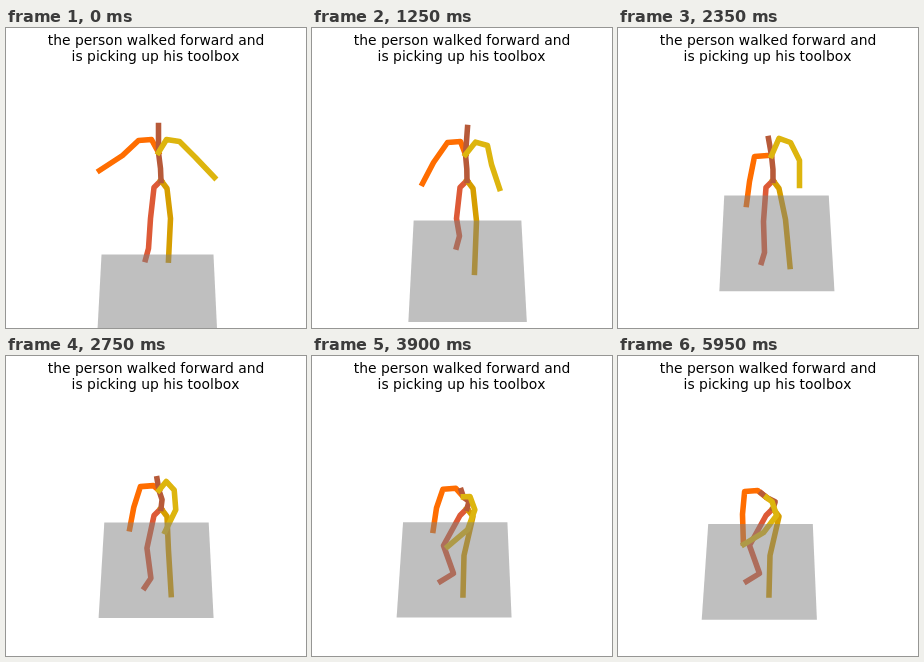
These frames come from a looping animation (300x300 px, 6 s). An HTML page with a canvas:

```html
<!DOCTYPE html>
<html lang="en">
<head>
<meta charset="utf-8">
<title>Stick figure motion</title>
<style>
  html, body { margin: 0; width: 100%; height: 100%; overflow: hidden; background: #fff; }
  canvas { display: block; }
</style>
</head>
<body>
<canvas id="stage" width="300" height="300"></canvas>
<script>
const LOOP = 6000, STEP = 50, WALK_END = 2350;
const ctx = document.getElementById('stage').getContext('2d');
const root = [154.5, 152], rightHip = [147.5, 159], leftHip = [160.5, 160];

// Upper body poses; each arm is shoulder, elbow, hand. Ground is the middle of its far edge.
const poses = [
  { at: 0,    ground: [151, 226],    chest: [152, 124], head: [152, 97],
    right: [[132, 112], [116, 127], [93, 142]],  left: [[173, 113], [189, 129], [208, 149]] },
  { at: 1250, ground: [155, 192],    chest: [153, 126], head: [155, 99],
    right: [[135, 114], [121, 134], [110, 155]], left: [[175, 117], [179, 136], [187, 160]] },
  { at: WALK_END, ground: [158, 167], chest: [153, 127], head: [150, 110],
    right: [[136, 128], [131, 153], [128, 176]], left: [[172, 114], [181, 132], [181, 157]] },
  { at: 3100, ground: [143, 165],    chest: [152, 140], head: [151, 133],
    right: [[132, 132], [124, 149], [119, 169]], left: [[164, 151], [159, 172], [139, 191]] },
  { at: LOOP, ground: [142, 167.5],  chest: [148, 141], head: [143, 137],
    right: [[126, 135], [124, 158], [125, 187]], left: [[158, 159], [145, 176], [125, 188]] }
];
// Right leg is knee, ankle, toe; left leg is knee, toe.
const stand = { right: [[144, 190], [142, 220], [139, 231]], left: [[164, 190], [162, 231.5]] };
const land  = { right: [[145, 193], [146, 224], [143, 234]], left: [[167, 191], [171.5, 238]] };
const kneel = { right: [[131, 189], [141, 217], [128, 225]], left: [[151.5, 199], [150.5, 238.5]] };

// Blends numbers, nested lists and objects alike.
function mix(a, b, u) {
  if (typeof a === 'number') return a + (b - a) * u;
  if (Array.isArray(a)) return a.map((v, i) => mix(v, b[i], u));
  return Object.fromEntries(Object.keys(a).map(k => [k, mix(a[k], b[k], u)]));
}

const shift = ([x, y], dx, dy) => [x + dx, y + dy];

function ease(t, from, to) {
  const u = Math.min(1, Math.max(0, (t - from) / (to - from)));
  return u * u * (3 - 2 * u);
}

function bodyAt(t) {
  const i = poses.findIndex(p => p.at > t), a = poses[i - 1], b = poses[i];
  return mix(a, b, (t - a.at) / (b.at - a.at));
}

function legsAt(t) {
  const walking = t < WALK_END;
  const legs = walking ? mix(stand, land, ease(t, 1250, WALK_END))
                       : mix(land, kneel, ease(t, WALK_END, 3400));
  // Positive swing puts the left foot forward.
  const swing = walking ? -Math.sin(Math.PI * t / WALK_END) * Math.cos(2 * Math.PI * (t - 650) / 1200) : 0;
  const [rightKnee, ankle, toe] = legs.right, [leftKnee, leftToe] = legs.left;
  return {
    right: [root, rightHip, rightKnee, shift(ankle, 5 * swing, -12.5 * swing), shift(toe, 5 * swing, -12.5 * swing)],
    left: [root, leftHip, shift(leftKnee, 0, 2.5 * swing), shift(leftToe, 0, 12.5 * swing)]
  };
}

function trace(points) {
  ctx.beginPath();
  for (const [x, y] of points) ctx.lineTo(x, y);
}

function limb(color, points) {
  ctx.strokeStyle = color;
  trace(points);
  ctx.stroke();
}

// A square in perspective: it grows as its far edge moves down the stage.
function ground([x, y]) {
  const near = y - 166, far = 52.2 + near * 0.063, front = 57.5 + near * 0.067;
  const frontX = x + (x - 154) * 0.1, frontY = y + 95.5 + near * 0.23;
  ctx.fillStyle = 'rgba(128,128,128,.5)';
  trace([[x - far, y], [x + far, y], [frontX + front, frontY], [frontX - front, frontY]]);
  ctx.fill();
}

function draw(t) {
  const body = bodyAt(t), legs = legsAt(t);
  const bend = (body.chest[1] - 124) / 16;
  const waist = shift(root, 2.5 * bend - 0.5, 5 * bend - 12);
  const rightCollar = shift(body.right[0], 13, -1);
  const leftCollar = shift(body.left[0], 8 * bend - 13, -2 - 11 * bend);

  ctx.fillStyle = '#fff';
  ctx.fillRect(0, 0, 300, 300);

  ctx.save();
  ctx.translate(0.5, 0.5);
  ctx.lineWidth = 5.55;
  ctx.lineCap = 'square';
  ctx.lineJoin = 'round';
  limb('#dd5a37', legs.right);
  limb('#d69e00', legs.left);
  limb('#ff6d00', [body.chest, rightCollar, ...body.right]);
  limb('#b75a39', [root, waist, body.chest, body.head]);
  limb('#ddb50e', [body.chest, leftCollar, ...body.left]);
  ground(body.ground);
  ctx.restore();

  ctx.fillStyle = '#000';
  ctx.font = '13.89px "DejaVu Sans", sans-serif';
  ctx.fontKerning = 'none';
  ctx.textAlign = 'center';
  ctx.fillText('the person walked forward and', 150, 17);
  ctx.fillText('is picking up his toolbox', 149.5, 33);
}

function tick() {
  draw(Math.floor(performance.now() % LOOP / STEP) * STEP);
  requestAnimationFrame(tick);
}
tick();
</script>
</body>
</html>
```
